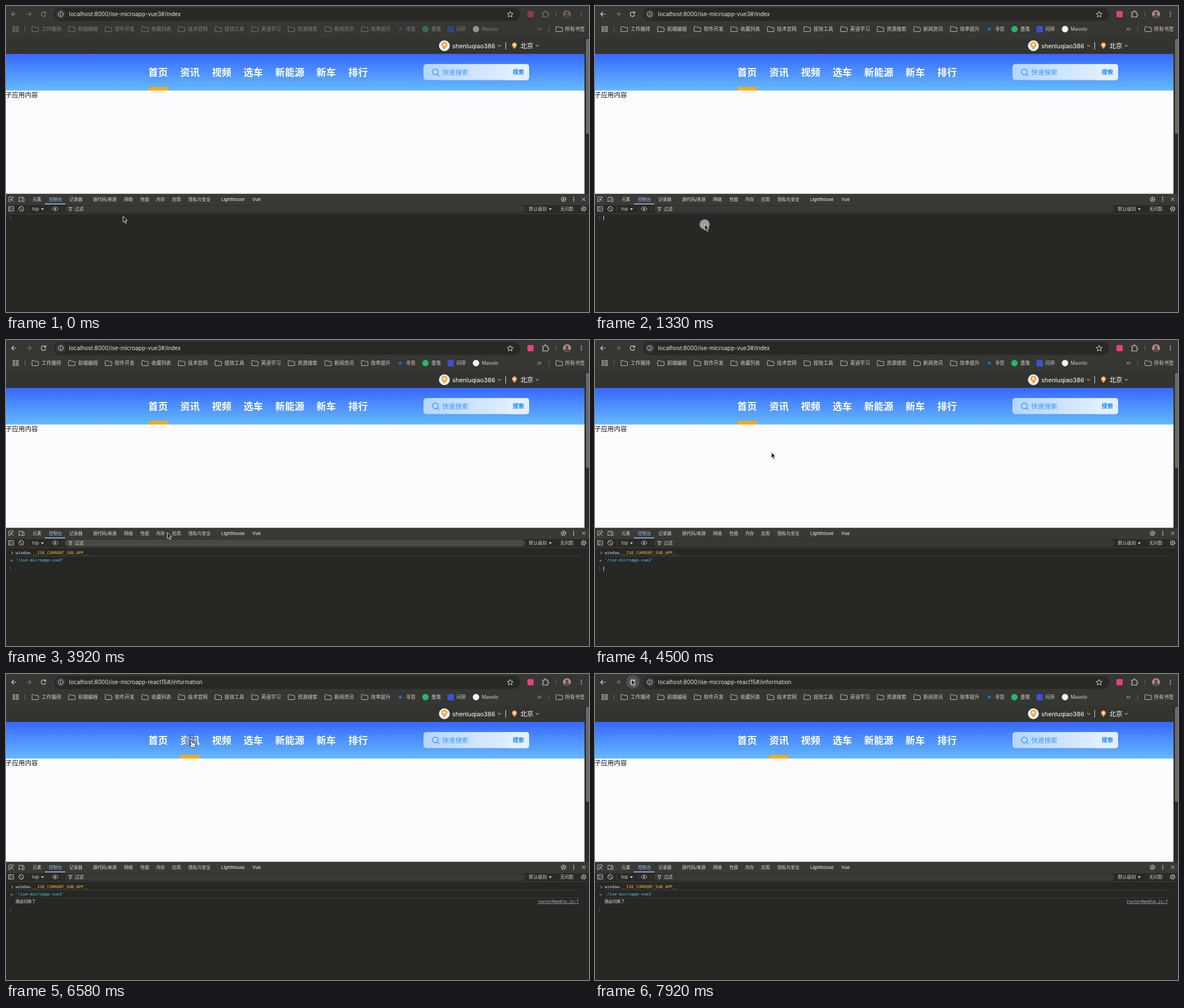
An HTML page that plays this animation: 1032x543 px, repeating every 8000 ms.

```html
<!DOCTYPE html>
<html lang="zh-CN">
<head>
<meta charset="utf-8">
<title>Micro app console</title>
<style>
html, body { margin: 0; width: 100%; height: 100%; overflow: hidden; background: #272724; }
svg { display: block; width: 1032px; height: 543px; }
text { font-family: Inter, "Noto Sans CJK SC", "Noto Sans CJK", sans-serif; white-space: pre; }
.mono { font-family: "DejaVu Sans Mono", "Noto Sans CJK SC", monospace; }
</style>
</head>
<body>
<svg id="stage" viewBox="0 0 1032 543"></svg>
<script>
const LOOP = 8000, STEP = 1000 / 12;
const LIGHT = '#d0d0d0';

const text = (x, y, s, size, fill = LIGHT, more = '') =>
  `<text x="${x}" y="${y}" font-size="${size}" fill="${fill}" ${more}>${s}</text>`;
const mono = (x, y, s, fill, more = '') => text(x, y, s, 7.13, fill, 'class="mono" ' + more);
const rect = (x, y, w, h, fill, r = 0, more = '') =>
  `<rect x="${x}" y="${y}" width="${w}" height="${h}" rx="${r}" fill="${fill}" ${more}/>`;
const dot = (x, y, r, fill, more = '') => `<circle cx="${x}" cy="${y}" r="${r}" fill="${fill}" ${more}/>`;
const line = (d, color = LIGHT, w = 1, more = '') =>
  `<path d="${d}" fill="none" stroke="${color}" stroke-width="${w}" ${more}/>`;
const fill = (d, color) => `<path d="${d}" fill="${color}"/>`;
const group = (id, s, more = '') => `<g id="${id}" ${more}>${s}</g>`;

const folder = x => line(`M${x} 45V37.5q0-1 1-1h3l1.5 1.5h5q1 0 1 1V44.500q0 1-1 1h-9.500q-1 0-1-1z`, LIGHT, .9);
const pin = (x, y, k) =>
  `<g transform="translate(${x} ${y}) scale(${k})">` +
  fill('M0 6C-2 3-4.500 1-4.500-1.500A4.500 4.500 0 0 1 4.500-1.500C4.500 1 2 3 0 6z', '#f9a856') +
  dot(0, -1.5, 1.7, '#fff') + '</g>';
const down = (x, y) => line(`M${x - 2.5} ${y - 1.2}l2.500 2.500 2.500-2.500`, '#fff');
const caretDown = x => fill(`M${x - 2.5} 359h5l-2.500 3.500z`, LIGHT);
const prompt = (x, y, color) => line(`M${x - 1.3} ${y - 2.3}l2.500 2.300-2.500 2.300`, color, .9);
const dots = (x, y, gap) => [-gap, 0, gap].map(d => dot(x, y + d, 1, LIGHT)).join('');
const gear = (x, y) => dot(x, y, 3.4, 'none', `stroke="${LIGHT}"`) + dot(x, y, 1.2, LIGHT) +
  dot(x, y, 4.3, 'none', `stroke="${LIGHT}" stroke-width="1.200" stroke-dasharray="1.600 2.900"`);

function browser() {
  const folders = ['工作搬砖', '前端编程', '软件开发', '收藏列表', '技术官网', '提效工具',
    '英语学习', '资源搜索', '新闻资讯', '效率提升'];
  const sites = [[708, '寻答'], [753, '墨笺'], [797, '问岸'], [842, 'Mavolo']];
  return rect(0, 0, 1032, 56, '#363633') +
    dot(67, 14, 12, '#50504e', 'id="hover"') +
    rect(85, 3, 825, 23.5, '#282825', 11.7) +
    dot(97, 14.5, 9, '#363634') +
    dot(97, 14.5, 4.3, 'none', 'stroke="#ddd"') + line('M97 14v3M97 11.800v1.200', '#ddd') +
    text(111.5, 18, '', 9.9, '#e3e3e3', 'id="url"') +
    line('M892.500 9.500l1.500 3.500 3.700.300-2.800 2.500.900 3.700-3.300-2-3.300 2 .900-3.700-2.800-2.500 3.700-.300z', '#ddd') +
    line('M44.500 14.500h-8.500M40.500 10.500l4 4-4 4', '#777', 1.2) +
    group('chrome',
      line('M18.500 14.500H10M14 10.500l-4 4 4 4', LIGHT, 1.2) +
      line('M69.500 12a4 4 0 1 0 .700 3.500M70.300 9.500v3.200h-3.200', LIGHT, 1.2) +
      rect(923, 9, 11, 11, '#ea4079', 1.5) +
      line('M950 11h3q0-2.500 1.600-2.500t1.600 2.500h2.800v3q2 0 2 1.500t-2 1.500v2.500h-9v-3q1.800-.200 1.800-1.500t-1.800-1.500z', LIGHT, 1.1) +
      dot(993, 14.5, 7, '#b88d82') + dot(993, 12.5, 2.7, '#59475a') +
      fill('M988 19q1-4 5-4t5 4q-2 2.500-5 2.500t-5-2.500z', '#59475a') +
      dots(1018.5, 14.5, 3.6) +
      [12.5, 18.5].map(x => [36.5, 42].map(y =>
        rect(x, y, 3.4, 3.4, 'none', 0, `stroke="${LIGHT}" stroke-width=".9"`)).join('')).join('') +
      folders.map((s, i) => folder(46 + i * 64.8) + text(63 + i * 64.75, 44.3, s, 8.75)).join('') +
      sites.map(([x, s]) => text(x, 44.3, s, 8.6)).join('') +
      dot(698, 41, 3, '#1767c9') + dot(742.5, 41, 5.7, '#27b765') +
      rect(781.5, 35.5, 11.5, 11.5, '#3c50d0', 2) + dot(832, 41, 5.7, '#f2f4f8') +
      line('M941 38.500l2.500 2.500-2.500 2.500M944.700 38.500l2.500 2.500-2.500 2.500')) +
    line('M33.500 36v10M961 36v10M973.500 9.500v10', '#66665f') +
    folder(973.5) + text(989.5, 44.3, '所有书签', 8.75);
}

function page() {
  const menu = [[252, '首页'], [308.5, '资讯'], [364.5, '视频'], [420.5, '选车'],
    [476.5, '新能源'], [549.5, '新车'], [606, '排行']];
  return rect(0, 56, 1024, 29, '#333330') +
    dot(776, 70.5, 9.3, '#fff', 'stroke="#9fd0ee"') + pin(776, 70.5, 1.25) +
    text(790, 74.8, 'shenluqiao386', 10.85, '#fff') + down(873.5, 70.5) +
    line('M884.500 64v13', '#ddd') + pin(900, 70.5, .95) +
    text(910.5, 75, '北京', 11.6, '#fff') + down(940.5, 70.5) +
    rect(0, 85, 1024, 65, 'url(#sky)') +
    menu.map(([x, s]) => text(x, 123.8, s, 17.2, '#fff', 'font-weight="700"')).join('') +
    `<path id="bar" d="M0 150v-4q0-2 2-2h31.500q2 0 2 2v4z" fill="#ffa90a"/>` +
    rect(739, 103, 187, 28.5, 'url(#field)', 5) +
    fill('M888 103h33q5 0 5 5v18.500q0 5-5 5h-33z', '#e4efff') +
    dot(760, 117, 5.2, 'none', 'stroke="#268fff" stroke-width="1.200"') +
    line('M763.800 120.800l3.500 3.500', '#268fff', 1.2) +
    text(772, 121.8, '快速搜索', 11.6, '#3a9aff') +
    text(897, 121, '搜索', 10, '#1487ff', 'font-weight="700"') +
    rect(0, 150, 1024, 183.5, '#fcfcfe') +
    text(-1, 162, '子应用内容', 11.5, '#111') +
    rect(1024, 56, 8, 277.5, '#2b2b29') + rect(1026.5, 58, 5.5, 169, '#696968', 2.7);
}

function devtools() {
  const tabs = [[47, '元素'], [112, '记录器'], [154, '源代码/来源'], [209, '网络'], [238, '性能'],
    [266, '内存'], [294, '应用'], [323, '隐私与安全'], [381, 'Lighthouse'], [436, 'Vue']];
  const bold = 'font-weight="500"';
  return rect(0, 333.5, 1032, 19, '#393936') +
    line('M8 347H5v-8h8v3M8.500 342.500l5 5M8.500 346v-3.500h3.500', LIGHT, .9) +
    line('M23 346v-6.500h8M22 346.500h5M28.500 341.500h3.500v5.500h-3.500z', LIGHT, .9) +
    tabs.map(([x, s]) => text(x, 346.2, s, 7.8, '#dcdcdc', bold)).join('') +
    text(76, 346.2, '控制台', 7.8, '#9dc1fb', bold) +
    rect(69, 350.5, 36, 1.6, '#9dc1fb') +
    gear(987, 343) + dots(1005, 343, 3.2) + line('M1019.500 340l6 6M1025.500 340l-6 6') +
    rect(0, 352.3, 1032, 16, '#2a2a27') + rect(0, 352, 1032, .6, '#4a4a46') +
    line('M4.500 356h9v8h-9zM7 356v8M9.500 358.300l2 1.700-2 1.700', LIGHT, .9) +
    dot(27, 360, 4.3, 'none', `stroke="${LIGHT}"`) + line('M24 357l6 6') +
    text(46.5, 363, 'top', 7.8) + caretDown(64.5) +
    line('M38.500 355.500v9M77 355.500v9M99.500 355.500v9', '#4a4a46', .7) +
    line('M81.500 360q5.500-7 11 0q-5.500 7-11 0z', LIGHT, .9) + dot(87, 360, 1.6, LIGHT) +
    rect(104, 354, 815, 12.5, '#383836', 6.2, 'id="filter"') +
    line('M111 357.500h6l-2.200 3v3h-1.600v-3z', LIGHT, .9) + text(122, 363, '过滤', 7.8) +
    text(925.5, 363, '默认级别', 8) + caretDown(963.5) +
    text(981, 363, '无问题', 7.8) + gear(1022.5, 360) +
    rect(0, 368, 1032, .7, '#4a4a46');
}

function log() {
  const code = (x, y) => mono(x, y, 'window.<tspan fill="#f3bd36">__ISE_CURRENT_SUB_APP__</tspan>', '#dbe3f4');
  const value = "'/ise-microapp-vue3'";
  return group('input', code(15, 378) + mono(15, 390, value, '#868683')) +
    group('result',
      prompt(11, 378, '#ccc') + code(17, 380) +
      rect(17, 383, 999, .8, '#3a4668') +
      line('M12.500 391.500h-4M10.300 389.300l-2.200 2.200 2.200 2.200', '#999', .8) +
      mono(17, 393, value, '#58cdf3')) +
    group('route',
      rect(17, 396.8, 999, .7, '#42423e') +
      mono(17, 406.3, '路由切换了', '#e2e2e2') +
      mono(941, 406.3, 'routerHandle.js:7', '#b5c3df', 'text-decoration="underline"')) +
    group('prompt', prompt(8, 0, '#4773b8')) + rect(0, -4, .9, 8, '#eee', 0, 'id="caret"');
}

const pointer =
  dot(0, 0, 9, '#a2a2a6', 'id="halo"') +
  group('arrow', '<path d="M0 0V10.200L2.400 8L4.200 12.300L6.200 11.500L4.400 7.300H7.600z" fill="#111" stroke="#fff" stroke-width=".9"/>') +
  group('hand', `<path d="M-.500 1.200q1.200-1 2 .200l.900 3.600 1.300-.300 1.500.500 1.300.300q1.300.600 1.200 2l-.500 3.500-1 2h-5.200l-3.400-4.300q-.300-1.500 1.500-.900l1 1-1.300-6.500z" fill="#fff" stroke="#111" stroke-width=".9"/>` +
    line('M2.800 8.500v2.500M4.500 8.500v2.500', '#111', .6));

document.getElementById('stage').innerHTML = `<defs>
  <linearGradient id="sky" x2="0" y2="1"><stop stop-color="#3768fb"/><stop offset="1" stop-color="#65b9ff"/></linearGradient>
  <linearGradient id="field"><stop stop-color="#b4d6ff"/><stop offset=".8" stop-color="#e0edff"/></linearGradient>
  </defs>` + rect(0, 0, 1032, 543, '#272724') + browser() + page() + devtools() + log() + group('pointer', pointer);

const el = id => document.getElementById(id);
const show = (id, on) => el(id).setAttribute('visibility', on ? 'inherit' : 'hidden');
const within = (t, ...spans) => spans.some(([a, b]) => t >= a && t < b);
const ramp = (t, a, b) => Math.min(1, Math.max(0, (t - a) / (b - a)));

// pointer path: time, x, y
const path = [[0, 207, 374], [83, 211, 358], [167, 199, 391], [333, 196, 390], [830, 194, 387.5],
  [3500, 194, 387.5], [3920, 285.5, 342], [4170, 300, 265], [4250, 302, 263], [4750, 322, 138],
  [5083, 327, 115], [5170, 327, 116], [6500, 327, 116], [6583, 327.5, 117.500], [6667, 327.5, 117.5],
  [6920, 262, 216], [7000, 240, 219], [7250, 110, 130], [7500, 46, 34], [7667, 86, 44],
  [7833, 68, 13], [7920, 64.5, 9.5], [8000, 64.5, 9.5]];

function pointerAt(t) {
  const i = Math.max(1, path.findIndex(p => p[0] >= t));
  const [a, b] = [path[i - 1], path[i]];
  const k = ramp(t, a[0], b[0]);
  return [a[1] + (b[1] - a[1]) * k, a[2] + (b[2] - a[2]) * k];
}

function draw(now) {
  const t = Math.floor((now % LOOP + 4) / STEP) * STEP + 4;
  const routed = t >= 5920, sent = t >= 2830, typed = within(t, [2080, 2830]);

  el('chrome').setAttribute('opacity', .48 + .52 * ramp(t, 330, 750));
  el('url').textContent = 'localhost:8000/ise-microapp-' + (routed ? 'react15#/information' : 'vue3#/index');
  el('bar').setAttribute('transform', `translate(${routed ? 308 : 252} 0)`);
  el('filter').setAttribute('fill', within(t, [3750, 4000]) ? '#484845' : '#383836');
  show('hover', t >= 7750);

  show('input', typed);
  show('result', sent);
  show('route', t >= 6080);
  const row = t >= 6080 ? 419 : sent ? 405.5 : 375.5;
  el('prompt').setAttribute('transform', `translate(0 ${row})`);
  show('caret', within(t, [830, 1080], [1170, 1670], [2080, 2670], [3250, 3750], [4250, 4750], [5670, 5840]));
  el('caret').setAttribute('transform', `translate(${typed ? 143.500 : 15} ${row + .5})`);

  const [x, y] = pointerAt(Math.min(t, LOOP));
  const hand = within(t, [4910, 6740]);
  el('pointer').setAttribute('transform', `translate(${x} ${y})`);
  show('pointer', t < 1500 || t >= 3580);
  show('arrow', !hand);
  show('hand', hand);
  const halo = el('halo');
  const press = t < 3000 ? ramp(t, 1000, 1250) * (1 - ramp(t, 1360, 1500)) : 0;
  const rest = ramp(t, 4990, 5170) * (t < 6740);
  halo.setAttribute('r', hand ? 11 : 9);
  halo.setAttribute('fill', hand ? '#46588f' : '#a2a2a6');
  halo.setAttribute('opacity', hand ? rest * .4 : press * .95);
  requestAnimationFrame(draw);
}
const start = performance.now();
const tick = draw;
draw = now => tick(Math.max(0, now - start));
requestAnimationFrame(draw);
</script>
</body>
</html>
```
